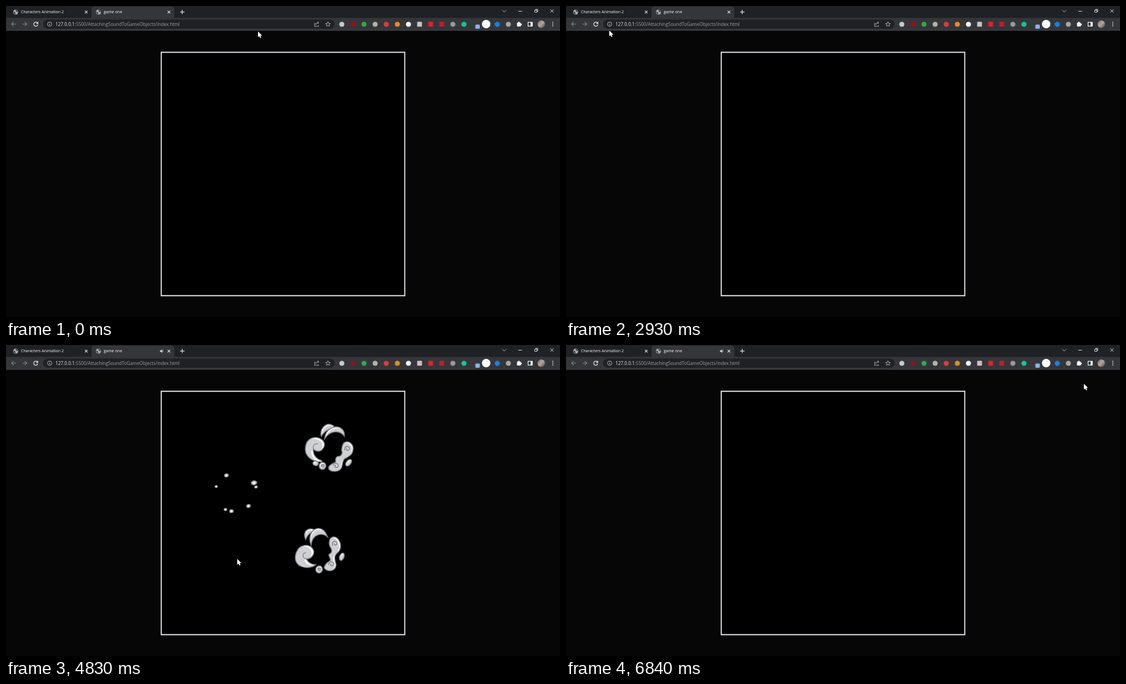
An HTML page with a canvas that plays this animation: 998x561 px, repeating every 7000 ms.

```html
<!DOCTYPE html>
<html lang="en">
<head>
<meta charset="utf-8">
<title>game one</title>
<style>
html, body { margin: 0; width: 100%; height: 100%; overflow: hidden; background: #060607; }
canvas { display: block; }
</style>
</head>
<body>
<canvas id="stage" width="998" height="561"></canvas>
<script>
const g = document.getElementById('stage').getContext('2d');
const LOOP = 7000, STEP = 183;
const FONT = '"Open Sans", "Noto Sans", sans-serif';
const GREY = '#9aa0a6', PALE = '#e8eaed', DARK = '#202124', EDGE = '#7b7c80', PUFF = '#cfd0d3';

// Pointer: time, x, y
const trail = [
  [0, 454, 46], [700, 421, 259], [1600, 421, 259], [2270, 261, 174], [3030, 69, 38],
  [3200, 57, 32], [3520, 57, 32], [3770, 400, 262], [4000, 416, 263], [4120, 416, 263],
  [4420, 583, 185], [4470, 579, 201], [4580, 568, 372], [4880, 405, 387], [5170, 367, 230],
  [5210, 370, 240], [5300, 370, 240], [5850, 466, 152], [5950, 602, 378], [6000, 604, 380],
  [6670, 948, 77], [6840, 933, 70], [LOOP, 933, 70]
];
// Explosions: start, x, y, angle
const booms = [
  [4000, 416, 263, -.2], [4420, 583, 185, 0], [4580, 568, 372, -.35],
  [4880, 405, 387, -.73], [5210, 370, 241.5, Math.PI], [5850, 466, 154, 2.56]
];

function line(d, color, width = 1) {
  g.strokeStyle = color;
  g.lineWidth = width;
  g.stroke(new Path2D(d));
}
function shape(d, color) {
  g.fillStyle = color;
  g.fill(new Path2D(d));
}
function rect(x, y, w, h, color, r = 0) {
  g.fillStyle = color;
  g.beginPath();
  g.roundRect(x, y, w, h, r);
  g.fill();
}
function disc(x, y, r, color) {
  g.fillStyle = color;
  g.beginPath();
  g.arc(x, y, r, 0, 7);
  g.fill();
}
function text(s, x, y, size, color) {
  g.font = `${size}px ${FONT}`;
  g.fillStyle = color;
  g.fillText(s, x, y);
  return x + g.measureText(s).width;
}
const cross = (x, y, r, color, w) =>
  line(`M${x - r} ${y - r}L${x + r} ${y + r}M${x + r} ${y - r}L${x - r} ${y + r}`, color, w);

function globe(x, y) {
  disc(x, y, 4.6, '#a9acb0');
  shape(`M${x - 4} ${y - 1}l3 1 1 2-1 2q-3-1-3-5M${x} ${y - 4}q4 0 4 4l-2 0-2-2z`, '#44464a');
}

function tabs(t) {
  rect(0, 0, 998, 22, DARK);
  rect(154, 1, 149, 22, '#35363a', [5, 5, 0, 0]);
  globe(17.5, 11);
  globe(166.5, 11);
  text('Characters Animation 2', 27, 13, 7.05, '#fff');
  text('game one', 176, 13, 7.2, '#fff');
  cross(144.5, 11, 2.3, PALE, 1.1);
  cross(293.5, 11, 2.3, PALE, 1.1);
  line('M313.5 10.8h8M317.5 6.8v8', PALE, 1.2);
  line('M894 7.5l3.5 3.5 3.5-3.5', '#bbb', 1);
  line('M923 9.5h6.5', PALE, 1);
  line('M952.5 7.5h4v4h-4zM954 7.5v-1.5h4v4h-1.5', PALE, .9);
  cross(983.5, 9, 2.8, PALE, 1);
  g.globalAlpha = Math.min(1, Math.max(0, (t - 4380) / 150));
  shape('M277.5 9.8h1.6l2-2v6.4l-2-2h-1.6z', '#dfe1e5');
  line('M282 9q1.5 2 0 4', '#dfe1e5', .9);
  g.globalAlpha = 1;
}

function extensions() {
  const dots = {
    605: '#c5c9cc', 625: '#8e1417', 645: '#38a34a', 665: '#b4b2aa', 685: '#e23a38',
    705: '#df8b2a', 725: '#f4f4f4', 805: '#96989b', 825: '#15c39a', 885: '#1a7fe8', 905: '#a3a6a8'
  };
  const squares = { 745: '#c4c5c5', 765: '#d9252d', 785: '#c9182c' };
  for (const x in dots) disc(+x, 33, 4.6, dots[x]);
  for (const x in squares) rect(x - 4.3, 28.6, 8.6, 8.6, squares[x], 1);
  rect(845.5, 33.5, 8, 7.5, '#8ab4f8', 1);
  disc(865, 32.7, 7.6, '#fff');
  rect(920.5, 30, 7, 7, '#f1f3f4', 1);
  disc(923.8, 29.8, 1.5, '#f1f3f4');
  disc(927.8, 33.3, 1.5, '#f1f3f4');
  line('M940.5 29.3h7.5v7h-7.5z', '#f1f3f4', 1.3);
  rect(945, 29, 3.5, 7.5, '#f1f3f4');
  const tone = g.createLinearGradient(958, 27, 970, 39);
  tone.addColorStop(0, '#74777a');
  tone.addColorStop(.5, '#b9a596');
  tone.addColorStop(1, '#544741');
  disc(964.3, 32.7, 6.7, tone);
  for (const y of [29.5, 32.7, 35.9]) disc(985, y, .9, PALE);
}

function toolbar(hover) {
  rect(0, 21.5, 998, 22.5, '#35363a');
  rect(0, 43.4, 998, 1.2, '#4a4b4e');
  rect(67, 24.5, 525, 16.5, DARK, 8.2);
  line('M18 32.7h-8m3.7-3.7l-3.7 3.7 3.7 3.7', '#85888c', 1.1);
  line('M29.5 32.7h8m-3.7-3.7l3.7 3.7-3.7 3.7', '#85888c', 1.1);
  if (hover) disc(53.7, 32.7, 8.4, '#505155');
  line('M56.4 30.2a3.7 3.7 0 1 0 .9 3.4', PALE, 1.3);
  shape('M57.8 28.2v4h-4z', PALE);
  g.beginPath();
  g.arc(78.7, 32.7, 3.9, 0, 7);
  g.strokeStyle = '#bdc1c6';
  g.lineWidth = .9;
  g.stroke();
  line('M78.7 32v3M78.7 30.3v1', '#bdc1c6', 1);
  const x = text('127.0.0.1', 89, 35.5, 8.22, PALE);
  text(':5500/AttachingSoundToGameObjects/index.html', x, 35.5, 8.22, GREY);
  line('M557.5 31h-1.5v5.7h7v-2M558 34q.5-4 5-4m-1.8-2l2.3 2-2.3 2', '#bdc1c6', .9);
  line('M580 28.5l1.3 2.8 3 .3-2.3 2 .7 3-2.7-1.6-2.7 1.6.7-3-2.3-2 3-.3z', '#bdc1c6', .9);
  extensions();
}

// Smoke pieces
function oval(x, y, rx, ry = rx, rot = 0) {
  const p = new Path2D();
  p.ellipse(x, y, rx, ry, rot, 0, 7);
  return p;
}
function body(path, dx = 2, dy = 2, rim = '#fff', width = 1.6) {
  g.save();
  g.clip(path);
  g.fillStyle = rim;
  g.fill(path);
  g.translate(dx, dy);
  g.fillStyle = PUFF;
  g.fill(path);
  g.restore();
  g.strokeStyle = EDGE;
  g.lineWidth = width;
  g.stroke(path);
}
function curl(x, y, r, start, turns = 1.2, width = 1.4) {
  g.beginPath();
  for (let i = 0; i <= 24; i++) {
    const a = start + i / 24 * turns * 2 * Math.PI, d = r * (1 - i / 32);
    g.lineTo(x + d * Math.cos(a), y + d * Math.sin(a));
  }
  g.strokeStyle = EDGE;
  g.lineWidth = width;
  g.stroke();
}
function pebble(x, y, rx, ry = rx * .85, rot = 0) {
  g.fillStyle = '#8f8f92';
  g.fill(oval(x, y, rx, ry, rot));
  g.fillStyle = '#f0f0f0';
  g.fill(oval(x, y, rx * .55, ry * .55, rot));
}

function cloud() {
  body(oval(-13, 20, 17.5), 4, -3);
  body(oval(18, 16.5, 15.5), -5, -4);
  body(oval(23.5, -6, 15.5), -6, -1);
  body(oval(-19, -10, 19.5, 20.5), 7, 0, '#a2a3a7');
  body(oval(3, -17, 19.5), -4, 4);
  // central swirl
  g.fillStyle = PUFF;
  g.fill(oval(-4, -8, 17, 14));
  shape('M24-1C26 13 15 23 4 21C-3 19-8 14-9 9C2 9 6 0 3-8C14-16 23-12 24-1Z', '#fff');
  shape('M19-8C24 5 13 13-3 11C9 6 12-6 3-14C10-17 16-15 19-8Z', PUFF);
  line('M24-2C27 13 15 24 4 21C-4 19-8 14-10 9', EDGE, 1.6);
  g.fillStyle = PUFF;
  g.fill(oval(-9.5, -4, 12));
  line('M4-9C8 2 0 8-8 8', '#fff', 3);
  curl(-9.5, -4, 13, 1.2, 1.05, 2);
}

function thickRing() {
  g.rotate(.73);
  body(new Path2D('M-34-9C-46-20-38-35-21-31C-29-28-34-20-34-9Z'));
  body(new Path2D('M-21-3C-41-24-20-52 1-28C-10-33-27-24-21-3Z'));
  body(new Path2D('M0 26C-10 43-41 46-41 18C-41 2-26-4-17 1C-8 6-10 19-20 23C-13 29-7 29 0 26Z'), -3, 3);
  line('M-20 23C-28 24-31 16-25 13', EDGE, 1.3);
  body(new Path2D('M9-31C16-37 30-28 30-15C30-8 24-5 27 2C29 9 37 12 34 20C31 28 22 30 16 26C14 20 18 14 21 10C22 5 15 5 15 0C20-5 17-10 11-14C6-19 5-27 9-31Z'), -2, 2);
  curl(18, -22, 5.5, 2);
  curl(26, 15, 5.5, 2.5);
  body(oval(38, -4.5, 4, 7), 1.5, 2);
  body(oval(8.5, 32, 6, 6.5), 2, 2);
  curl(8.5, 32, 3.2, 3);
}

function ring() {
  g.rotate(.2);
  body(new Path2D('M-19-17C-25-30-15-43-5-41C1-40 4-36 4-34C-6-37-14-28-19-17Z'));
  body(new Path2D('M-12-13C-14-32 0-41 11-39C18-37 22-31 22-25C12-35-6-31-12-13Z'));
  body(new Path2D('M-9 28C-26 32-43 24-43 6C-43-8-32-14-23-13C-12-12-7-3-12 5C-15 13-26 11-28 8C-28 18-20 25-9 26Z'), -3, 3);
  line('M-28 8C-31 2-27-3-22-2', EDGE, 1.3);
  body(new Path2D('M24-14C31-20 42-15 42-4C43 5 37 9 31 14C26 20 30 26 28 32C25 41 11 43 6 38C3 32 11 28 16 23C15 20 13 16 17 13C24 11 24 8 24 4C21 0 21-10 24-14Z'), -2, 2);
  curl(32, -4, 5.5, 2.5);
  curl(18, 30, 5.5, 3);
  body(oval(39, 20, 4, 7, .5), 1.5, 2);
  body(oval(-6, 35, 6, 6.5), 2, 2);
  curl(-5.5, 35, 3.2, 3);
  body(oval(-19, 33, 5, 4), 2, 2);
}

function scraps() {
  g.rotate(.35);
  body(new Path2D('M-23-27C-23-34-17-36-13-34C-12-31-18-31-20-27Z'), 1, 1);
  pebble(5, -38, 3.6, 4);
  body(new Path2D('M21-30C24-34 28-29 32-26C36-22 39-13 36-7C33-3 26-5 26-11C29-18 26-23 21-30Z'), 1.5, 2, '#fff', 1.4);
  curl(31.5, -9, 3, 3);
  pebble(-36, 5, 4, 4.3);
  pebble(20, 20, 3.8);
  body(new Path2D('M23 28C29 26 26 18 32 16C36 19 30 28 23 28Z'), 1, 1, '#fff', 1.3);
  body(oval(-11, 35, 4, 5.5, -.7), 1, 1);
}

function specks() {
  pebble(-35, -15, 3);
  pebble(-13, -31, 4.2);
  pebble(33, -8, 5.8, 4.4);
  pebble(35, 0, 3.2);
  pebble(15, 31, 4.2);
  pebble(-17, 34, 4.1);
  pebble(-27, 29, 3.2);
}

const stages = [cloud, thickRing, ring, scraps, specks];

function boom(t, [start, x, y, angle]) {
  const draw = stages[Math.floor((t - start) / STEP)];
  if (!draw) return;
  g.save();
  g.translate(x, y);
  g.rotate(angle);
  draw();
  g.restore();
}

function pointerAt(t) {
  const i = trail.findIndex(k => k[0] > t);
  const [t0, x0, y0] = trail[i - 1], [t1, x1, y1] = trail[i];
  const u = (t - t0) / (t1 - t0), e = u * u * (3 - 2 * u);
  return [x0 + (x1 - x0) * e, y0 + (y1 - y0) * e];
}
function pointer(x, y) {
  g.save();
  g.translate(x, y);
  const arrow = 'M0 0V10.3L2.4 8.2 4 11.8 5.7 11 4.2 7.6 7.2 7.3Z';
  line(arrow, '#222', 1);
  shape(arrow, '#fff');
  g.restore();
}

function frame() {
  const t = performance.now() % LOOP;
  const [x, y] = pointerAt(t);
  rect(0, 0, 998, 561, '#060607');
  rect(278.7, 82.5, 440.6, 441, '#ececf4');
  rect(280.6, 84.5, 436.8, 437, '#000');
  for (const b of booms) boom(t, b);
  tabs(t);
  toolbar(Math.hypot(x - 54, y - 33) < 10);
  pointer(x, y);
  requestAnimationFrame(frame);
}
frame();
</script>
</body>
</html>
```
